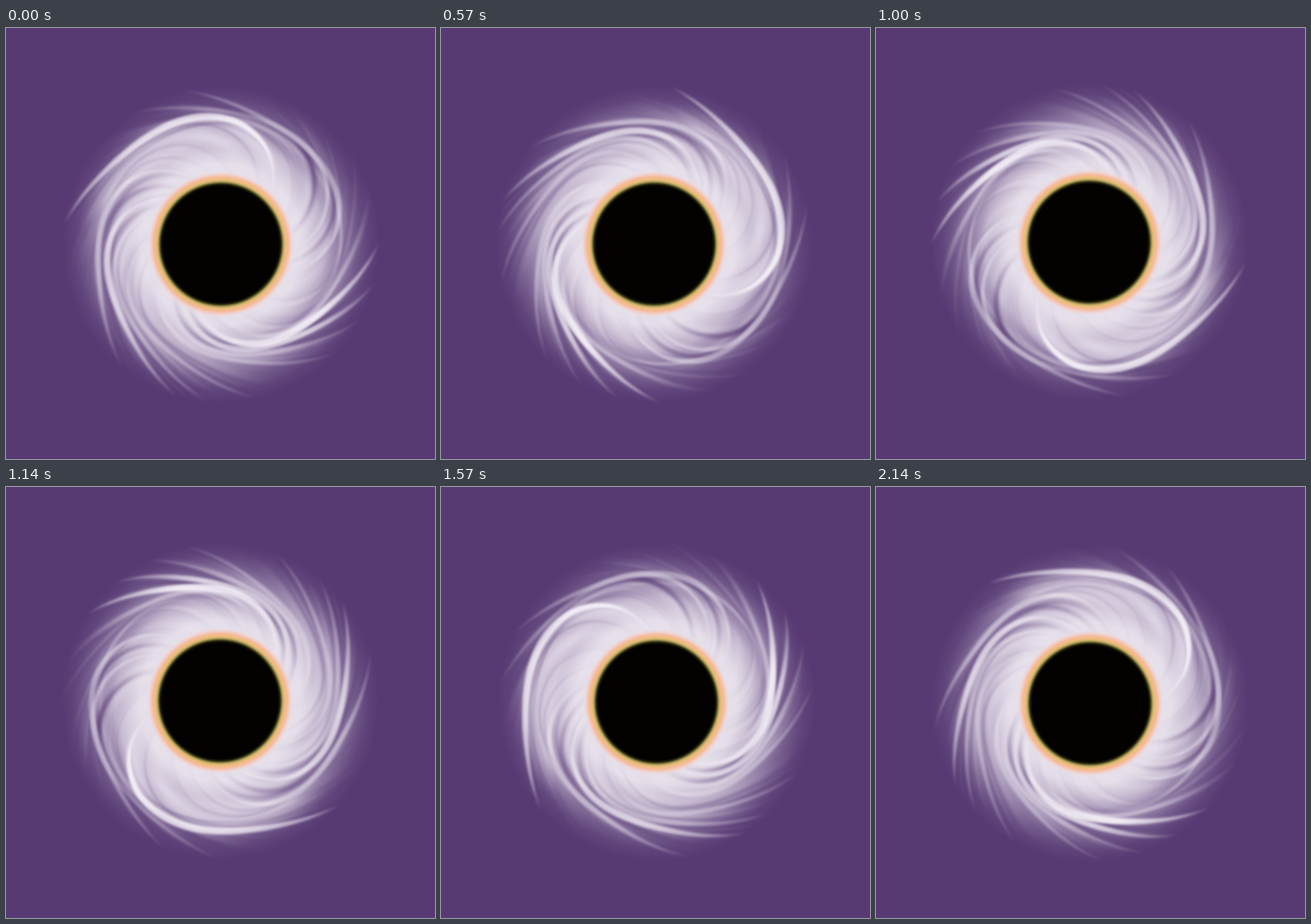
An HTML page with a canvas that plays this animation: 557 by 560 pixels, repeating every 2280 ms.

```html
<!DOCTYPE html>
<html lang="en">
<head>
<meta charset="utf-8">
<title>Black hole</title>
<style>
  html, body { margin: 0; width: 100%; height: 100%; overflow: hidden; background: #573a73; }
  canvas { display: block; }
</style>
</head>
<body>
<canvas id="stage" width="557" height="560"></canvas>
<script>
const W = 557, H = 560, LOOP = 2280, TURN = 1862, FPS = 7;
const HOLE = [279, 281], PIVOT = [278, 279.6];
const INNER = 92, OUTER = 206;
const WHITE = '250,247,252', LILAC = '224,216,230', PURPLE = '87,58,115';
const TAU = Math.PI * 2, DEG = Math.PI / 180;

let seed = 7;
const rand = (lo, hi) => {
  seed = (seed * 16807) % 2147483647;
  return lo + (hi - lo) * seed / 2147483647;
};

function radial(ctx, radius, stops) {
  const g = ctx.createRadialGradient(0, 0, 0, 0, 0, radius);
  for (const [r, color] of stops) g.addColorStop(r / radius, color);
  return g;
}

function disc(ctx, radius, stops) {
  ctx.fillStyle = radial(ctx, radius, stops);
  ctx.beginPath();
  ctx.arc(0, 0, radius, 0, TAU);
  ctx.fill();
}

// A tapered spiral from the rim to the hole; its bend follows the side of the disc.
function strand(ctx, rgb, angle, opacity, width = 8, outer = OUTER) {
  const bend = .55 - .95 * Math.cos((angle - 40) * DEG);
  const sweep = 112 + 12 * bend;
  const edge = (s, side) => {
    const depth = s + .1 * Math.sin(TAU * s) - bend * s * s * (1 - s);
    const half = width / 2 * Math.sin(Math.PI * (.04 + .92 * s)) ** .8;
    const r = outer - (outer - INNER) * depth + side * half;
    const a = (angle + sweep * s) * DEG;
    ctx.lineTo(r * Math.cos(a), r * Math.sin(a));
  };
  const steps = 48;
  ctx.beginPath();
  for (let i = 0; i <= steps; i++) edge(i / steps, 1);
  for (let i = steps; i >= 0; i--) edge(i / steps, -1);
  const tint = k => `rgba(${rgb},${opacity * k})`;
  ctx.fillStyle = radial(ctx, outer, [
    [INNER - 5, tint(.2)], [INNER + 35, tint(.8)], [INNER + 65, tint(1)],
    [outer - 14, tint(.5)], [outer, tint(0)]
  ]);
  ctx.fill();
}

function paintSwirl() {
  const layer = document.createElement('canvas');
  layer.width = W;
  layer.height = H;
  const ctx = layer.getContext('2d');
  ctx.translate(...HOLE);

  disc(ctx, OUTER, [
    [0, 'rgba(238,233,241,.97)'], [105, 'rgba(238,233,241,.95)'],
    [135, 'rgba(226,218,232,.82)'], [155, 'rgba(215,205,224,.55)'],
    [175, 'rgba(205,194,216,.25)'], [192, 'rgba(190,178,204,.08)'],
    [OUTER, 'rgba(190,178,204,0)']
  ]);

  // Broad soft flow, then fine wisps.
  ctx.filter = 'blur(4px)';
  strand(ctx, LILAC, 191, .8, 44, OUTER - 24);
  for (let i = 0; i < 28; i++) {
    strand(ctx, i % 2 ? WHITE : PURPLE, i * 13 + rand(-6, 6), rand(.1, .3), rand(8, 16), rand(185, 205));
  }
  ctx.filter = 'blur(1.5px)';
  for (let i = 0; i < 45; i++) {
    strand(ctx, i % 2 ? WHITE : PURPLE, i * 8 + rand(-4, 4), rand(.08, .25), rand(2, 5), rand(185, 211));
  }

  // Main lanes: [angle at the rim, opacity]
  ctx.filter = 'blur(2px)';
  for (const [angle, opacity] of [[225, .8], [250, .6], [12, .8], [27, .4], [104, .4], [120, .5]]) {
    strand(ctx, PURPLE, angle, opacity);
  }
  ctx.filter = 'blur(1.6px)';
  for (const [angle, opacity] of [
    [191, .9], [240, .4], [260, .5], [343, .3], [3, .9], [18, .7],
    [32, .45], [47, .4], [80, .4], [98, .45], [110, .7], [132, .5]
  ]) {
    strand(ctx, WHITE, angle, opacity, 5 + 5 * opacity);
  }
  ctx.filter = 'none';

  disc(ctx, 95, [
    [0, '#030200'], [75.5, '#030200'], [78, '#24230c'], [80, '#79743a'],
    [82, '#ceb26a'], [84.5, '#efbd80'], [87.5, 'rgba(247,183,146,.95)'],
    [91, 'rgba(247,194,176,.5)'], [95, 'rgba(247,210,204,0)']
  ]);
  return layer;
}

// Steady turning with a slower and a faster side.
function rotation(ms) {
  const p = ms / TURN;
  return p * TAU - (12 + 14 * Math.cos(TAU * (p - .35))) * DEG;
}

const stage = document.getElementById('stage').getContext('2d');
const swirl = paintSwirl();

function draw(now) {
  const centis = Math.floor(now % LOOP / 10);
  const step = Math.floor((centis * 10 + 9) * FPS / 1000);
  stage.fillStyle = '#573a73';
  stage.fillRect(0, 0, W, H);
  stage.save();
  stage.translate(...PIVOT);
  stage.rotate(rotation(step * 1000 / FPS));
  stage.drawImage(swirl, -PIVOT[0], -PIVOT[1]);
  stage.restore();
}

const begin = performance.now();
function tick() {
  draw(performance.now() - begin);
  requestAnimationFrame(tick);
}
tick();
</script>
</body>
</html>
```
